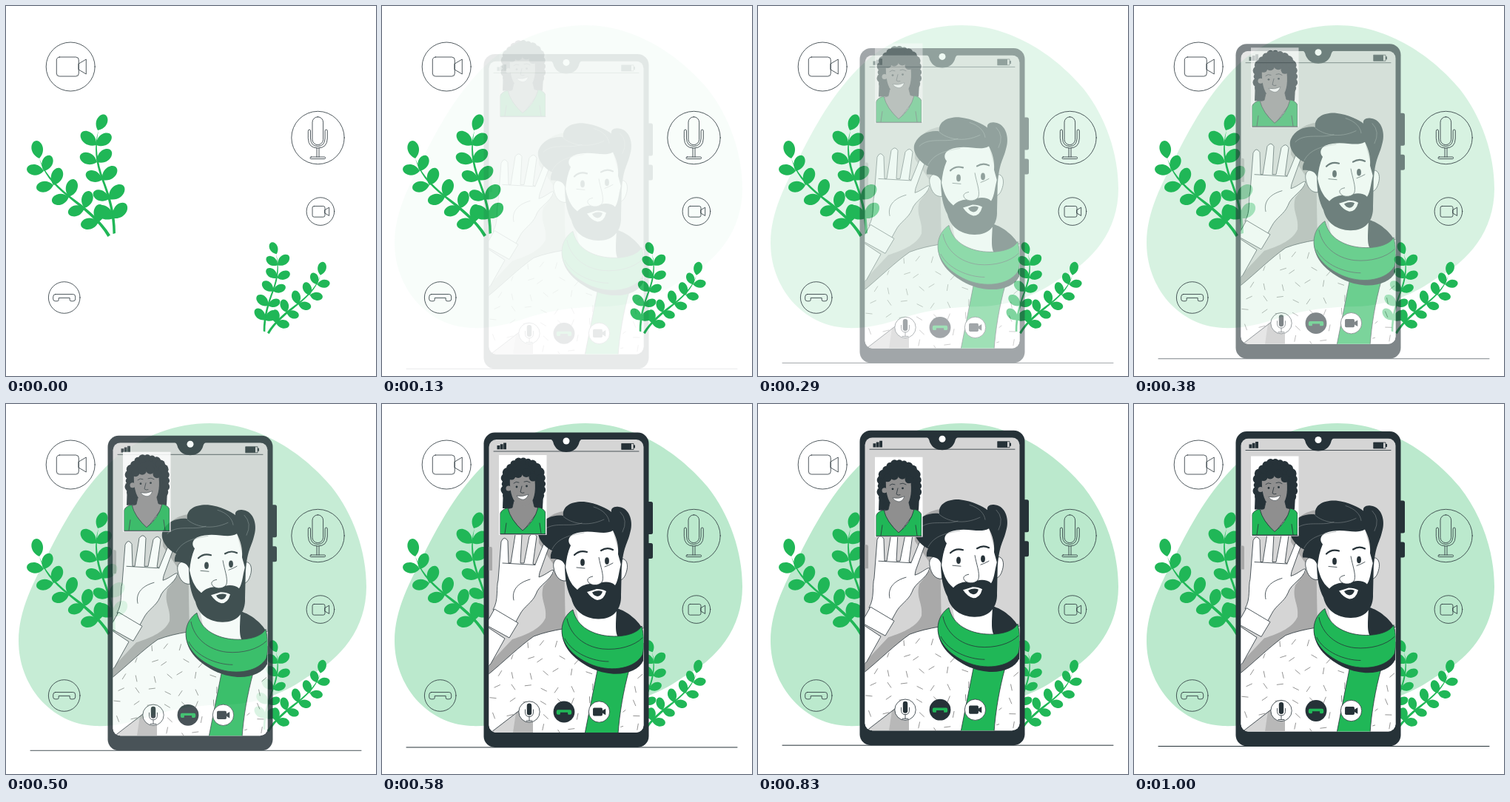
Recreate the animation shown at these times as an HTML page. Size 500 by 500 pixels, loop 1040 ms.

```html
<!DOCTYPE html>
<html lang="en">
<head>
<meta charset="utf-8">
<title>Video call</title>
<style>
html, body { margin: 0; width: 100%; height: 100%; overflow: hidden; background: #fff; }
svg { display: block; width: 100vw; height: 100vh; }
.dark { fill: #263238; }
.green { fill: #20b757; }
.white { fill: #fff; }
.skin { fill: #8f8f8f; }
.line { fill: none; stroke: #263238; stroke-width: .8; stroke-linecap: round; stroke-linejoin: round; }
.edge { stroke: #263238; stroke-width: .8; stroke-linejoin: round; }
</style>
</head>
<body>
<svg viewBox="0 0 500 500">
  <defs>
    <path id="leaf" d="M0 0C.25-.35 .6-.36 .8-.26C1.06-.13 1.06 .13 .8 .26C.6 .36 .25 .35 0 0Z"/>
    <path id="handset" d="M-12-4.5H12Q15-4.5 15-1V2Q15 4.8 12 4.8H9.5Q7.5 4.8 7.5 3V.5H-7.5V3Q-7.5 4.8-9.5 4.8H-12Q-15 4.8-15 2V-1Q-15-4.5-12-4.5Z"/>
    <g id="camera">
      <rect x="-18.5" y="-13" width="30" height="26" rx="4" vector-effect="non-scaling-stroke"/>
      <path d="M11.5-4L21.5-10V10L11.5 4Z" vector-effect="non-scaling-stroke"/>
    </g>
    <clipPath id="screen"><rect x="144.5" y="45" width="209" height="396" rx="10"/></clipPath>
    <clipPath id="shirtClip"><path d="M145 364C165 347 185 327 205 313L244 303C244 325 262 343 290 356L276 441H204V402L186 411L148 440H145ZM334 361L352 347V441H321Z"/></clipPath>
    <clipPath id="card"><rect x="159.5" y="72" width="61.5" height="107"/></clipPath>
  </defs>

  <path id="blob" fill="#bbe9cd" d="M275 26C345 26 405 70 440 112C470 150 487 200 487 247C487 303 453 345 407 369C380 388 345 405 300 406C250 407 225 413 200 420C170 431 145 436 120 435C60 432 17 380 17 320C17 278 38 240 56 204C80 156 108 107 150 71C185 43 230 26 275 26Z"/>

  <g id="plants" class="green">
    <path d="M137.5 312C125 290 105 276 85 259C62 241 50 225 45 206C51 223 64 239 86 256.5C108 272 129 290 141 309.5Z"/>
    <path d="M144.5 308C144.5 280 137 255 129 234C121 212 118 190 125 168C120 190 124 212 131.5 233C141 257 148 280 148 307Z"/>
  </g>
  <use href="#plants" transform="matrix(-.75 0 0 .75 458.7 209.2)"/>

  <g class="line">
    <circle cx="87.2" cy="82" r="33"/>
    <use href="#camera" x="86.8" y="82"/>
    <circle cx="421.5" cy="178" r="35.7"/>
    <rect x="414" y="149.8" width="14.6" height="37.8" rx="7.3"/>
    <path d="M408.3 169Q408.3 167 409.9 167T411.5 169V179Q412 189.5 421.3 189.5T431.1 179V169Q431.1 167 432.7 167T434.3 169V179Q434 192 421.3 192T408.3 179ZM420 192V204M423 192V204"/>
    <rect x="411" y="204" width="20.6" height="2.6" rx="1.3"/>
    <circle cx="424.9" cy="277.6" r="18.8"/>
    <use href="#camera" transform="translate(424.5 277.8) scale(.565)"/>
    <circle cx="78.7" cy="394" r="21.3"/>
    <use href="#handset" x="78.7" y="394"/>
  </g>

  <g id="phone">
    <path class="line" d="M33 461H480" style="stroke-width:1"/>
    <g class="dark">
      <rect x="354" y="129" width="12" height="44" rx="2.5"/>
      <rect x="354" y="185" width="12" height="21" rx="2.5"/>
      <rect x="137.5" y="35.5" width="223" height="425.5" rx="15"/>
    </g>
    <g clip-path="url(#screen)">
      <path fill="#d5d5d5" d="M144 45H354V442H144Z"/>
      <g fill="#a9a9a9">
        <path d="M245 142C222 146 211 160 212 185L236 220L218 243C213 262 223 268 221 286C215 300 198 308 176 315L145 348V364L205 312L248 305Z"/>
        <path d="M144 190H147Q149 190 149 193V222H144Z"/>
      </g>

      <path class="white edge" d="M145 300L166 314L147 348L143 352V299Z"/>
      <path class="white edge" d="M150 275C158 262 154 245 157 235L161 183Q165 174 170 182L171 212H174L180 174Q185 167 189 174L187 212H192L199 176Q205 168 209 176L204 213L207 214L218 187Q224 182 226 189L213 225L212 231C222 228 230 219 232 222C228 236 212 241 208 254C203 266 192 270 186 282L180 293Z"/>
      <path class="line" d="M163 212L207 214.500M200 234C182 239 175 250 178 262"/>
      <path class="white edge" d="M152 274L184 293L172 313L143 297V290Z"/>

      <path class="white edge" d="M143 363C165 345 185 325 205 311C218 306 232 303 244 301L355 300V443H143Z"/>
      <path fill="#d5d5d5" d="M147 441L185 411L204 402V441Z"/>
      <path fill="#b8b8b8" d="M177 441L181 414L204 402V441Z"/>
      <path class="line" d="M147 441L186 411"/>
      <g id="dashes" clip-path="url(#shirtClip)" stroke="#777" stroke-width=".8"/>

      <path class="white" d="M262 270L320 265V314H270Z"/>
      <path class="dark" d="M317 273C332 277 346 290 351 299C349 310 335 316 322 314C314 311 316 295 317 273Z"/>
      <path class="green edge" d="M292 352L274 443H319C321 415 326 385 334 356Z"/>
      <path class="dark" d="M243 303C243 328 262 344 285 355C315 368 345 361 353 344L354 320Z"/>
      <path class="green edge" d="M258 275C250 280 243 290 243 303C243 324 262 341 285 350C312 360 342 354 352 336C355 324 354 310 351 297C343 311 313 314 292 308C272 302 262 291 258 275Z"/>
      <path class="line" d="M250 287C254 309 273 325 298 328C320 330 341 324 352 313M247 314C257 334 285 345 306 345"/>

      <path class="white edge" d="M248 208C238 202 230 208 232 218C234 230 240 237 249 236ZM322 207C329 204 333 212 331 221C329 230 326 234 322 235Z"/>
      <path class="white" d="M250 180Q270 160 312 168L323 210V250C320 275 305 284 290 284C265 284 248 255 247 215Z"/>
      <path class="dark" d="M247 212C247 235 250 249 256 260C260 278 275 287 292 287.5C312 288 324 275 323 255L324 210C320 221 320 235 315 242C309 236 298 237 291 240C280 239 270 241 264 248C254 240 250 229 247 212Z"/>
      <path class="white" d="M277 251Q284 249 290 247Q298 247 303 250Q300 262 291 262Q283 260 277 251Z"/>
      <path class="dark" d="M284 251.500Q292 247.500 298 250.500Q296 257 291 257Q286 256 284 251.500Z"/>
      <path class="white edge" d="M293 204C295 216 300 228 298 236C296 242 284 244 279 238C276 234 279 231 285 230"/>
      <path class="line" d="M263 218L274 219M301 217Q307 215 312 212"/>
      <path class="line" d="M260 201Q267 194 277 197M296 195Q304 190 312 194" style="stroke-width:2.2"/>
      <g class="dark"><ellipse cx="271" cy="211" rx="2.9" ry="4.8"/><ellipse cx="304" cy="209" rx="2.9" ry="4.8"/></g>
      <path class="dark" d="M248 218C246 208 240 206 228 206Q227 201 230 195C218 190 207 175 212 164C218 150 235 146 245 148C243 134 258 128 273 129C290 131 304 138 310 143C309 138 313 135 320 136C336 138 340 158 335 172C332 185 326 190 324 218L319 200C320 188 317 178 312 168C298 176 282 164 258 173C251 177 251 184 255 188C251 197 249 207 248 218Z"/>
      <g class="line" style="stroke:#8c9497;stroke-width:.5">
        <path d="M218 168C231 155 252 164 270 158M245 149C255 158 277 164 300 153M286 136C299 140 306 148 307 156M230 193C238 177 256 174 273 171M322 143Q333 154 325 170"/>
      </g>
    </g>

    <path class="dark" d="M226 44C232 45 231 50 233 53C236 59 242 62 249 62C256 62 262 59 265 53C267 50 266 45 272 44Z"/>
    <circle class="white" cx="249" cy="47" r="4.5"/>
    <path class="line" d="M151 61H347"/>
    <g class="dark">
      <path d="M155.500 53H159.300V58.300H155.500ZM159.800 51.300H163.600V58.300H159.800ZM164.100 49.500H168V58.300H164.100Z"/>
      <path d="M324 50.500H337V58.500H324ZM340 52.500H342V56.500H340Z"/>
      <path class="line" d="M324 50.500H340V58.500H324Z"/>
    </g>

    <circle class="white edge" cx="199" cy="413" r="14.2"/>
    <rect class="dark" x="195.800" y="401.500" width="6.400" height="16" rx="3.200"/>
    <path class="line" d="M193.500 410V414Q194 419.500 199 419.500T204.500 414V410M199 419.500V425M195 425H203"/>
    <circle class="dark" cx="246" cy="413" r="14.4"/>
    <use href="#handset" class="green" transform="translate(246 413.400) scale(.68)"/>
    <circle class="white edge" cx="293.500" cy="413" r="14.2"/>
    <use href="#camera" class="dark" transform="translate(293 413) scale(.43)"/>
  </g>

  <g id="inset">
    <path class="white" d="M158 72H222.500V180H158Z"/>
    <g clip-path="url(#card)">
      <g id="curls" class="dark"><path d="M167 92Q178 78 198 80Q216 88 218 125L217 144H163L164 115Z"/></g>
      <path class="skin edge" d="M178 134L176 143L166 146L190 176L214 144L206 142L203 130Z"/>
      <path class="skin" d="M173 101Q190 92 206 102C208 116 207 130 201 137Q191 145 182 138C175 131 172 118 173 101Z"/>
      <circle class="skin" cx="171" cy="117" r="3.5"/>
      <path class="green edge" d="M159.500 178.500V151Q162 145 170 143.500Q174 160 190 174Q206 162 211 142.500Q219 144 221 150V178.500Z"/>
      <path class="line" d="M166 178L168 164M215 178L213 164"/>
      <g class="dark">
        <circle cx="175" cy="100" r="5.500"/><circle cx="184" cy="97" r="6"/><circle cx="195" cy="96" r="6"/><circle cx="204" cy="102" r="5.500"/>
        <circle cx="182" cy="115" r="1.4"/><circle cx="195.500" cy="114" r="1.4"/>
      </g>
      <path class="line" d="M178 110Q181 107 185 109M192 108Q196 106 200 109M189 114L187 122Q189 124 192 123"/>
      <path class="white edge" d="M182 127Q190 129 198 125Q195 133 189 132Q184 131 182 127Z" style="stroke-width:.5"/>
    </g>
    <path class="line" d="M160 179H221"/>
  </g>
</svg>
<script>
const $ = id => document.getElementById(id);

function add(parent, tag, attrs) {
  const node = document.createElementNS("http://www.w3.org/2000/svg", tag);
  for (const name in attrs) node.setAttribute(name, attrs[name]);
  parent.appendChild(node);
}

// Each row: leaf base, then the tips of the leaves that grow from it.
const leaves = [
  [45, 206, 40, 182],
  [51, 223, 28, 220, 60, 202],
  [64, 242, 41, 246, 73, 219],
  [85, 258, 62, 264, 92, 234],
  [106, 273, 84, 280, 113, 250],
  [125, 292, 101, 296, 127, 268],
  [124, 168, 134, 147],
  [122, 188, 102, 171, 142, 174],
  [123, 211, 100, 202, 142, 195],
  [130, 235, 108, 226, 149, 218],
  [139, 261, 118, 252, 159, 243],
  [145, 287, 122, 272, 162, 267]
];
for (const [x, y, ...tips] of leaves)
  for (let i = 0; i < tips.length; i += 2) {
    const dx = tips[i] - x, dy = tips[i + 1] - y;
    const angle = Math.atan2(dy, dx) * 180 / Math.PI;
    add($("plants"), "use", { href: "#leaf",
      transform: `translate(${x} ${y}) rotate(${angle}) scale(${Math.hypot(dx, dy)})` });
  }

let seed = 11;
const random = () => (seed = seed * 16807 % 2147483647) / 2147483647;

for (let y = 318; y < 440; y += 19)
  for (let x = 150; x < 354; x += 21) {
    const cx = x + random() * 10, cy = y + random() * 9, a = random() * Math.PI;
    const dx = 4.5 * Math.cos(a), dy = 4.5 * Math.sin(a);
    add($("dashes"), "line", { x1: cx - dx, y1: cy - dy, x2: cx + dx, y2: cy + dy });
  }

for (let i = 0; i < 24; i++) {
  const a = i / 24 * 2 * Math.PI;
  add($("curls"), "circle", {
    cx: 191 + 25 * Math.cos(a), cy: 111 + 31 * Math.sin(a), r: 4 + 3 * random() });
}

const LOOP = 1040, STEPS = 25;

// Eased rise, followed by a slight sink.
function rise(step) {
  if (step > 18) return 1.5 * (1 - Math.cos((step - 18) / 12 * Math.PI));
  const p = Math.min(1, Math.max(0, (step - 1) / 16.3));
  return 15.25 * (1 + Math.cos(p * Math.PI));
}

function draw(time) {
  const step = Math.min(STEPS - 1, Math.floor((time % LOOP + 4) / LOOP * STEPS));
  const opacity = Math.min(1, Math.max(0, (step - 1.8) / 12.2));
  const y = rise(step);
  for (const id of ["blob", "phone", "inset"]) $(id).setAttribute("opacity", opacity);
  $("phone").setAttribute("transform", `translate(0 ${y})`);
  $("inset").setAttribute("transform", `translate(0 ${-y})`);
}

const start = performance.now();
function tick() {
  draw(performance.now() - start);
  requestAnimationFrame(tick);
}
tick();
</script>
</body>
</html>
```
